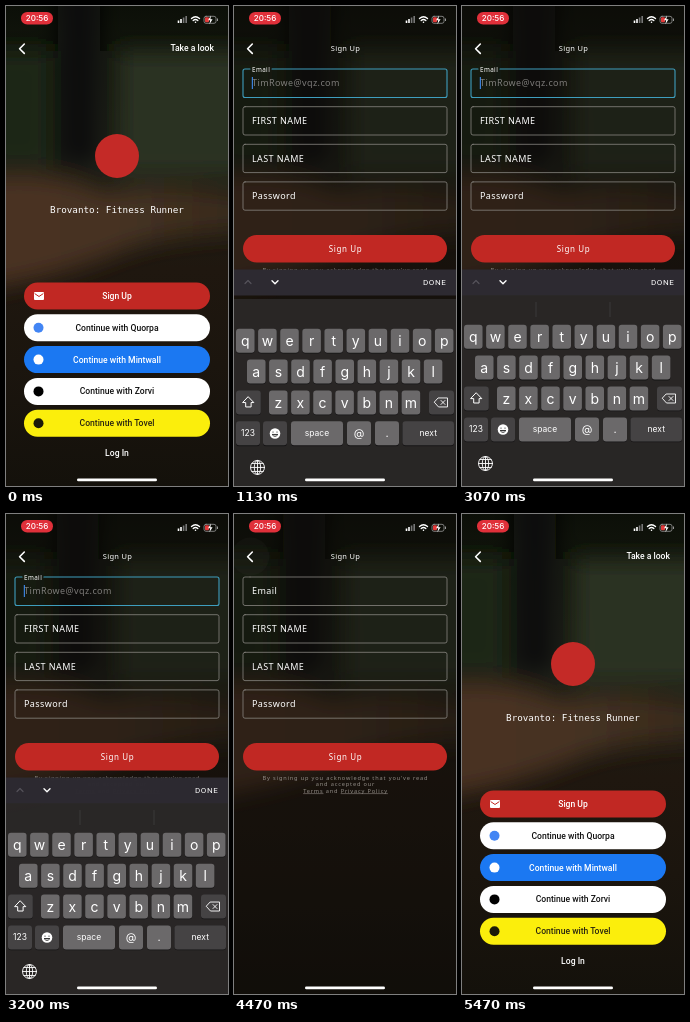
These frames come from a looping animation (222x480 px, 5540 ms). An HTML page:

```html
<!DOCTYPE html>
<html lang="en">
<head>
<meta charset="utf-8">
<title>Sign up flow</title>
<style>
html, body { margin: 0; width: 100%; height: 100%; overflow: hidden; background: #12130d; }
svg { display: block; width: 100vw; height: 100vh; }
text { fill: #fff; dominant-baseline: central; }
.mid { text-anchor: middle; }
.app { font: 500 8.6px Roboto, sans-serif; }
.form { font: 9px "Noto Sans", sans-serif; letter-spacing: .4px; }
.keys { font: 14px Inter, sans-serif; }
.line { fill: none; stroke: #fff; stroke-linecap: round; stroke-linejoin: round; }
.terms { font-size: 5.6px; letter-spacing: .85px; fill: #938e88; }
</style>
</head>
<body>
<svg viewBox="0 0 222 480" preserveAspectRatio="none">
  <defs>
    <linearGradient id="base" x2="0" y2="1">
      <stop stop-color="#0c0f08"/><stop offset=".12" stop-color="#13170d"/>
      <stop offset=".34" stop-color="#1b1d13"/><stop offset=".55" stop-color="#1f170f"/>
      <stop offset=".75" stop-color="#1b150e"/><stop offset="1" stop-color="#14110b"/>
    </linearGradient>
    <linearGradient id="skin">
      <stop stop-color="#4a3422"/><stop offset=".5" stop-color="#463222"/><stop offset="1" stop-color="#33271a"/>
    </linearGradient>
    <linearGradient id="shine">
      <stop stop-color="#fff" stop-opacity=".38"/><stop offset="1" stop-color="#fff" stop-opacity=".04"/>
    </linearGradient>
    <filter id="soft" filterUnits="userSpaceOnUse" x="-60" y="-60" width="342" height="600">
      <feGaussianBlur stdDeviation="11"/>
    </filter>
  </defs>

  <rect width="222" height="480" fill="url(#base)"/>
  <g id="blur"><g filter="url(#soft)">
    <rect x="-40" y="45" width="85" height="115" fill="#1f2517"/>
    <rect x="52" y="-30" width="42" height="190" fill="#0b0e07"/>
    <rect x="112" y="45" width="150" height="125" fill="#2c3024"/>
    <path d="M-40 172Q50 160 100 186Q150 172 262 190V226Q150 228 105 250Q40 275-40 285z" fill="url(#skin)"/>
  </g></g>
  <rect id="shade" width="222" height="480" fill="#0c0b08"/>

  <g id="login" class="app">
    <text x="208" y="42" text-anchor="end">Take a look</text>
    <g id="brand">
      <circle cx="111" cy="150" r="22" fill="#c42a27"/>
      <text class="mid" x="111" y="203" style="font:9.27px 'DejaVu Sans Mono',monospace">Brovanto: Fitness Runner</text>
    </g>
    <g id="stack">
      <g id="buttons"></g>
      <rect id="splash" x="18" y="276.5" width="186" height="27" rx="13.5" fill="url(#shine)"/>
      <rect x="28" y="286" width="10" height="8" rx="1" fill="#fff"/>
      <path class="line" d="M29 287.8l4 2.7 4-2.7" style="stroke:#c12823"/>
      <text class="mid" x="111" y="447">Log In</text>
    </g>
  </g>

  <circle id="press" cx="16.5" cy="42.5" r="19" fill="#fff"/>
  <path class="line" d="M18.300 38l-4.700 4.700 4.700 4.700" stroke-width="1.6"/>

  <g class="form">
    <text id="head" class="mid" x="111.5" y="42" style="font-size:7.5px;letter-spacing:.3px">Sign Up</text>
    <g class="item">
      <path id="edge" class="line"/>
      <text id="hint" x="18" y="76.6" style="fill:#9a9896">TimRowe@vqz.com</text>
      <rect id="caret" x="17.8" y="71" width="1.1" height="12" fill="#3f8cf0"/>
      <text id="label" x="18">Email</text>
    </g>
    <g id="fields"></g>
    <g class="item">
      <rect x="9" y="229" width="204" height="27.5" rx="13.7" fill="#c12823"/>
      <text class="mid" x="111.5" y="242.3" style="font-size:8px;font-weight:500;letter-spacing:.6px">Sign Up</text>
      <g class="mid">
        <text class="terms" x="111.5" y="264.2">By signing up you acknowledge that you've read</text>
        <text class="terms" x="111.5" y="270.2">and accepted our</text>
        <text class="terms" x="111.5" y="276.5"><tspan text-decoration="underline">Terms</tspan> and <tspan text-decoration="underline">Privacy Policy</tspan></text>
      </g>
    </g>
  </g>

  <g id="bar">
    <rect y="263.5" width="222" height="26" fill="#2d2a31"/>
    <path class="line" d="M11 277.500l3-3 3 3" style="stroke:#55535a" stroke-width="1.2"/>
    <path class="line" d="M38 274.800l3 3 3-3" stroke-width="1.4"/>
    <text x="189" y="276" style="font:8px Roboto,sans-serif;letter-spacing:.6px">DONE</text>
  </g>

  <g id="board" class="keys">
    <rect y="289" width="222" height="191" fill="#2d2b2b" fill-opacity=".85"/>
    <path id="split" d="M74 296v15M148 296v15" stroke="#444243" stroke-width=".7"/>
    <g id="caps"></g>
    <path class="line" d="M14.4 387l5.4 5.6h-2.7v4.4h-5.4v-4.4H9z"/>
    <path class="line" d="M204.5 388h9v9h-9l-4-4.5zM207 390.5l4 4m0-4l-4 4" stroke-width=".9"/>
    <circle cx="41" cy="423.5" r="5.3" fill="#fff"/>
    <path class="line" d="M39 422v.3M43 422v.3M38.3 424.8q2.7 3.4 5.4 0z" style="stroke:#333"/>
    <g class="line" stroke-width=".9">
      <circle cx="23.5" cy="457.5" r="7"/>
      <ellipse cx="23.5" cy="457.5" rx="3.2" ry="7"/>
      <path d="M16.5 457.5h14M23.5 450.5v14M17.8 453.5h11.4M17.8 461.5h11.4"/>
    </g>
  </g>

  <rect x="15" y="6" width="32" height="12.5" rx="6.2" fill="#e0303a"/>
  <text class="mid" x="31" y="12.3" style="font:500 8.1px Inter,sans-serif">20:56</text>
  <path d="M172.5 17v-2.5M175 17v-4" stroke="#fff" stroke-width="1.6"/>
  <path d="M177.6 17v-5.5M180.2 17v-7" stroke="#777" stroke-width="1.6"/>
  <path class="line" d="M185.5 12.5q4-3.6 8 0M187.2 14.5q2.3-2 4.6 0M189.4 16.2h.2" stroke-width="1.4"/>
  <rect class="line" x="198" y="10.3" width="12" height="7" rx="2" style="stroke:#999" stroke-width=".8"/>
  <rect x="199" y="11.3" width="4" height="5" rx="1" fill="#e33b3b"/>
  <path d="M205 9.5l-3 4.8h2.2l-.8 4 3.2-5h-2.2z" fill="#fff"/>
  <path d="M211.5 12.5v2.5" stroke="#999"/>
  <rect x="71" y="472.5" width="80" height="2.8" rx="1.4" fill="#fff"/>
</svg>
<script>
const LOOP = 5540;
const $ = id => document.getElementById(id);
const fade = (id, v) => $(id).setAttribute('opacity', v);
const move = (el, x, y) => el.setAttribute('transform', `translate(${x} ${y})`);

$('buttons').innerHTML = [
  ['Sign Up', '#c12823', '#fff'],
  ['Continue with Quorpa', '#fff', '#111', '#4285f4'],
  ['Continue with Mintwall', '#1b78f2', '#fff', '#fff'],
  ['Continue with Zorvi', '#fff', '#111', '#000'],
  ['Continue with Tovel', '#fbee0c', '#2b2710', '#1c1a08']
].map(([name, fill, ink, dot], i) => {
  const y = 276.5 + 31.8 * i;
  return `<rect x="18" y="${y}" width="186" height="27" rx="13.5" fill="${fill}"/>` +
    (dot ? `<circle cx="32.5" cy="${y + 13.5}" r="5" fill="${dot}"/>` : '') +
    `<text class="mid" x="111" y="${y + 13.4}" style="fill:${ink}">${name}</text>`;
}).join('');

$('fields').innerHTML = ['FIRST NAME', 'LAST NAME', 'Password'].map((name, i) => {
  const y = 100.7 + 37.6 * i;
  return `<g class="item"><rect class="line" x="9" y="${y}" width="204" height="28.3" rx="2"
    style="stroke:#888681" stroke-width=".8"/><text x="18" y="${y + 13.7}">${name}</text></g>`;
}).join('');

const DARK = '#454344', LIGHT = '#6b696a';
const key = (x, y, w, name, fill = LIGHT, size = 14) =>
  `<rect x="${x}" y="${y + .8}" width="${w}" height="24" rx="3" fill="#151415"/>
   <rect x="${x}" y="${y}" width="${w}" height="24" rx="3" fill="${fill}"/>
   <text class="mid" x="${x + w / 2}" y="${y + 11.6}" style="font-size:${size}px">${name}</text>`;
$('caps').innerHTML = [['qwertyuiop', 2], ['asdfghjkl', 13], ['zxcvbnm', 35]].map(([row, x], r) =>
  [...row].map((c, i) => key(x + 22.1 * i, 318.7 + 30.9 * r, 18.6, c)).join('')).join('') +
  key(2, 380.5, 24.8, '', DARK) + key(195, 380.5, 25, '', DARK) +
  key(2, 411.4, 24, '123', DARK, 8.5) + key(29, 411.4, 24, '', DARK) +
  key(57, 411.4, 52, 'space', LIGHT, 8.5) + key(113, 411.4, 24, '@', LIGHT, 11) +
  key(141, 411.4, 24, '.', LIGHT, 11) + key(168.5, 411.4, 51.5, 'next', DARK, 8.5);

const items = [...document.querySelectorAll('.item')];
const enter = [800, 852, 875, 890, 900];
const leave = [4745, 4720, 4692, 4655, 4490];

function draw(t) {
  const ramp = (a, b) => Math.min(1, Math.max(0, (t - a) / (b - a)));
  const spring = start => {
    const s = .018 * Math.max(0, t - start);
    return 1 - (1 + s) * Math.exp(-s);
  };
  const login = 1 - ramp(820, 1050) + ramp(4580, 4960);
  const focus = ramp(800, 960) - ramp(3200, 3400);

  move($('blur'), 3 * Math.sin(2 * Math.PI * t / LOOP), 0);
  fade('shade', .42 * (1 - login));
  fade('login', login);
  fade('splash', ramp(640, 800) - ramp(1050, 1100));
  fade('press', .1 * (ramp(4440, 4600) - ramp(4800, 5100)));
  fade('head', ramp(790, 1020) - ramp(4700, 4960));

  // The bottom safe area closes while the keyboard is open.
  const drop = t > 809 && t < 3200 ? 19 : 0;
  move($('stack'), 0, drop);
  move($('brand'), 0, drop / 2);

  items.forEach((el, i) => {
    const e = ramp(enter[i], enter[i] + 230) - ramp(leave[i], leave[i] + 300);
    move(el, 50 * (1 - e), 0);
    el.setAttribute('opacity', e ** 1.5);
  });

  const mix = (a, b) => a + (b - a) * focus;
  $('edge').setAttribute('d',
    `M${16 + 22 * focus} 63H211q2 0 2 2V89.5q0 2-2 2H11q-2 0-2-2V65q0-2 2-2H16`);
  $('edge').style.stroke = `rgb(${mix(136, 62)},${mix(134, 158)},${mix(129, 190)})`;
  $('edge').style.strokeWidth = mix(.8, 1.1);
  $('label').setAttribute('y', mix(76.7, 63.2));
  $('label').style.fontSize = mix(9, 6.3) + 'px';
  fade('hint', focus * .8);
  fade('caret', t > 860 && t < 3250 && (t < 1060 || (t - 1060) % 1000 < 500) ? focus : 0);

  fade('bar', ramp(800, 860) - ramp(3200, 3300));
  fade('split', ramp(1130, 1400));
  move($('board'), 0, 191 * (1 - spring(809) + spring(3200)));
}

const begin = performance.now();
function tick() {
  draw((performance.now() - begin) % LOOP);
  requestAnimationFrame(tick);
}
tick();
</script>
</body>
</html>
```
